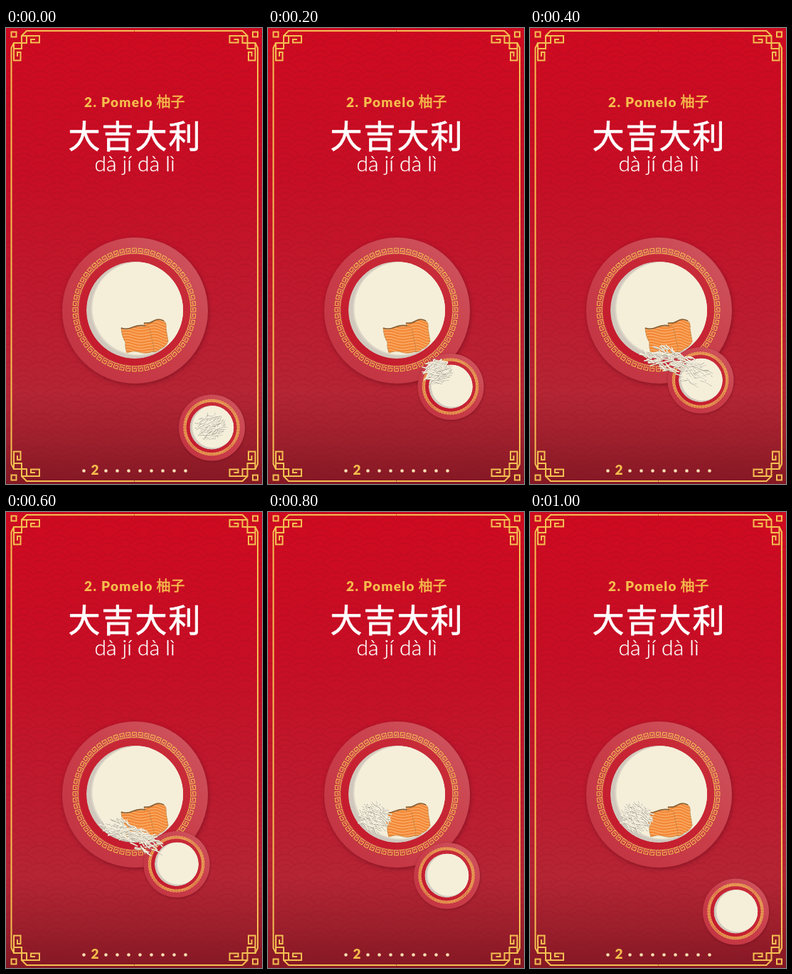
Animation of 360x640 px, one loop 1200 ms. Source, as an HTML page:

```html
<!DOCTYPE html>
<html lang="zh">
<head>
<meta charset="utf-8">
<title>Pomelo 柚子</title>
<style>
html, body { margin: 0; height: 100%; overflow: hidden; background: #c20f26 }
svg { display: block; width: 100vw; height: 100vh }
text { text-anchor: middle }
.latin { font-family: Lato, "Open Sans", sans-serif }
.cjk { font-family: "Noto Sans CJK SC", "Noto Sans CJK", sans-serif }
.line { fill: none; stroke: #f4bf52 }
.plate { filter: drop-shadow(1px 2px 3px #5a081880) }
</style>
</head>
<body>
<svg viewBox="0 0 360 640">
  <defs>
    <linearGradient id="bg" x2="0" y2="1">
      <stop stop-color="#cf0a20"/>
      <stop offset=".32" stop-color="#c70e25"/>
      <stop offset=".62" stop-color="#be1b2f"/>
      <stop offset=".8" stop-color="#b52534"/>
      <stop offset=".9" stop-color="#9f202d"/>
      <stop offset="1" stop-color="#831824"/>
    </linearGradient>
    <linearGradient id="rim" x1=".85" y1=".15" x2=".2" y2=".9">
      <stop stop-color="#cd505a"/>
      <stop offset=".5" stop-color="#c93d49"/>
      <stop offset="1" stop-color="#c43543"/>
    </linearGradient>
    <linearGradient id="well" x1="1" x2="0" y2="1">
      <stop stop-color="#c92f3b"/>
      <stop offset="1" stop-color="#c4182b"/>
    </linearGradient>
    <g id="scale">
      <path d="M-17.4-9.8A20 20 0 0 1 17.4-9.8M-11.4-8.1A14 14 0 0 1 11.4-8.1M-6.5-4.7A8 8 0 0 1 6.5-4.7"/>
    </g>
    <pattern id="waves" width="40" height="20" patternUnits="userSpaceOnUse" patternTransform="scale(1.2)">
      <g fill="none" stroke="#8c0d20">
        <use href="#scale" x="20" y="20.5"/>
        <use href="#scale" y="30.5"/>
        <use href="#scale" x="40" y="30.5"/>
      </g>
    </pattern>
    <g id="corner" class="line" stroke-width="2">
      <path d="M180.5 4H29L22 11M11 21L7.5 28V320M7.5 5.5H14.5V12.5H7.5Z"/>
      <path d="M41 16H35V20.5H47V11H22V29H11M16 40V34H20.5V45.5H11V21H29V11"/>
    </g>
    <clipPath id="dish"><circle r="68"/></clipPath>
    <clipPath id="sliceA"><path id="a" d="M162 421Q169 424 178 420T196 418Q203 419 203 427L206 441Q209 449 207 454Q196 458 188 455T170 456Q167 448 168 441Q163 434 162 421Z"/></clipPath>
    <clipPath id="sliceB"><path id="b" d="M194 414Q202 415 208 411T222 411Q226 414 225 422L228 440Q224 448 217 450Q212 456 203 454L198 436Z"/></clipPath>
  </defs>

  <rect width="360" height="640" fill="url(#bg)"/>
  <rect width="360" height="640" fill="url(#waves)" opacity=".2"/>
  <use href="#corner"/>
  <use href="#corner" transform="matrix(-1 0 0 1 361.5 0)"/>
  <use href="#corner" transform="matrix(1 0 0 -1 0 640)"/>
  <use href="#corner" transform="matrix(-1 0 0 -1 361.5 640)"/>

  <g fill="#f5bd4c">
    <text class="latin" x="158.5" y="110.5" font-size="19" font-weight="900" letter-spacing="1.3">2. Pomelo</text>
    <text class="cjk" x="231.5" y="111" font-size="20" stroke="#f5bd4c" stroke-width=".5">柚子</text>
    <text class="latin" x="125" y="627" font-size="19" font-weight="900">2</text>
  </g>
  <g fill="#fff" stroke="#fff" stroke-linejoin="round">
    <text class="cjk" x="181.5" y="168.5" font-size="45" letter-spacing="2" stroke-width=".8">大吉大利</text>
    <text class="latin" x="181" y="201" font-size="30" font-weight="300" stroke-width=".3">dà jí dà lì</text>
  </g>
  <g id="dots" fill="#f8dfb2"></g>

  <g id="big" class="plate" transform="translate(181.5 396.5)"></g>
  <g id="salmon"></g>
  <g id="small" class="plate"></g>
  <g id="shreds" fill="none" stroke-linecap="round"></g>
</svg>
<script>
const $ = id => document.getElementById(id);
const list = (n, f) => Array.from({ length: n }, (_, i) => f(i)).join('');

let seed = 77;
const rnd = () => (seed = seed * 16807 % 2147483647) / 2147483647;

$('dots').innerHTML = list(10, i => i == 1 ? '' : `<circle cx="${i ? 108.5 + 16 * i : 109.5}" cy="621.5" r="2.3"/>`);

const plate = weight => `
  <circle r="102.5" fill="url(#rim)"/>
  <circle r="78" cx="-.5" cy="-1" fill="url(#well)"/>
  <g class="line" stroke-width="${weight}" transform="translate(-1 -1)">${list(60, i =>
    `<path transform="rotate(${i * 6}) translate(0 -83)" d="M-4.2 3.6H2.9V-3.4H-2.8V1H.6V-1"/>`)}</g>
  <g clip-path="url(#dish)" transform="translate(-.5 -.5)">
    <circle r="68" fill="#d0c8bd"/>
    <circle r="66" cx="4.5" cy="-2" fill="#dfd8c8"/>
    <circle r="65" cx="5.5" cy="-2.5" fill="#f5efda"/>
  </g>`;
$('big').innerHTML = plate(1);
$('small').innerHTML = plate(1.9);

const slice = (id, clip, rise) => `
  <use href="#${id}" fill="#f6903f" stroke="#b5803f" stroke-width=".8"/>
  <g clip-path="url(#${clip})" fill="none">
    <g stroke="#fbb374">${list(14, i =>
      `<path d="M158 ${414 + i * 4}q10-5 20-1t20 ${rise}t20 0t20 ${rise}"/>`)}</g>
    <g stroke="#ea7b2c" stroke-width=".6">${list(14, i =>
      `<path d="M158 ${416 + i * 4}q10-5 20-1t20 ${rise}t20 0t20 ${rise}"/>`)}</g>
  </g>`;
$('salmon').innerHTML = slice('b', 'sliceB', -2) + slice('a', 'sliceA', 1) +
  '<path d="M162 421Q169 424 178 420T196 418M194 414Q202 415 208 411T222 411" fill="none" stroke="#86623a" stroke-width="1.6"/>';

// Small plate centre and shreds (line from, line to, radius, tilt) for each pose
const poses = [
  { at: [289.5, 561], heap: [288, 559, 288, 559, 17, -25] },
  { at: [257, 503.5], heap: [238.5, 482, 238.5, 482, 16, -15] },
  { at: [240, 494.5], heap: [241, 486, 175, 458, 17, 18] },
  { at: [240, 494.5], heap: [207, 467, 149, 440, 14, 22] },
  { at: [251.5, 510.5], heap: [150.5, 428.5, 150.5, 428.5, 19, 35] },
  { at: [289.5, 561], heap: [150.5, 428.5, 150.5, 428.5, 19, 35] }
];

const strands = Array.from({ length: 160 }, () => ({
  dir: rnd() * 2 * Math.PI, far: Math.sqrt(rnd()), along: rnd(),
  turn: (rnd() - .5) * 85, half: 3.5 + rnd() * 3.5, bend: (rnd() - .5) * 4
}));

function strand({ dir, far, along, turn, half, bend }, [x1, y1, x2, y2, r, tilt]) {
  const x = x1 + (x2 - x1) * along + Math.cos(dir) * far * r;
  const y = y1 + (y2 - y1) * along + Math.sin(dir) * far * r;
  const d = `M${-half} 0Q0 ${bend} ${half} 0`;
  return `<g transform="translate(${x} ${y}) rotate(${tilt + turn})">
    <path d="${d}" transform="translate(.2 .5)" stroke="#96917e" stroke-width="1.2"/>
    <path d="${d}" stroke="#f7f2e2" stroke-width="1.4"/></g>`;
}

let shown = -1;
function draw(now) {
  const step = Math.floor(now % 1200 / 200);
  if (step != shown) {
    const { at, heap } = poses[shown = step];
    $('small').setAttribute('transform', `translate(${at}) scale(.454)`);
    $('shreds').innerHTML = strands.map(s => strand(s, heap)).join('');
  }
  requestAnimationFrame(draw);
}
draw(0);
</script>
</body>
</html>
```
